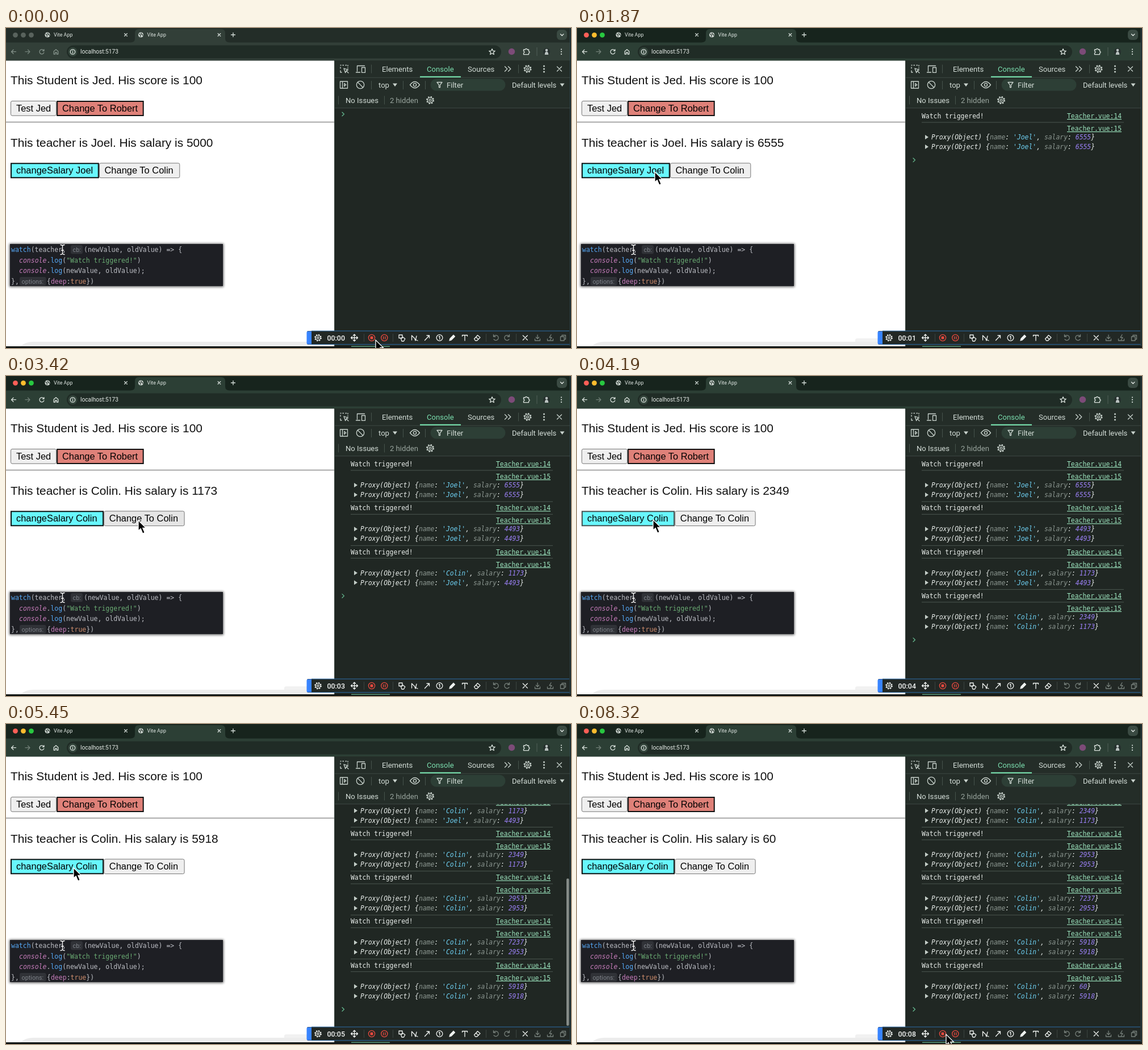
These frames come from a looping animation (995x563 px, 8.39 s). An HTML page:

```html
<!DOCTYPE html>
<html lang="en">
<head>
<meta charset="utf-8">
<title>Watch demo</title>
<style>
html, body { margin: 0; width: 100%; height: 100%; overflow: hidden; background: #fff; }
svg { display: block; width: 995px; height: 563px; }
text { white-space: pre; }
.tab { font: 8.9px Roboto, sans-serif; fill: #dfe6e2; }
.url { font: 10.2px Roboto, sans-serif; fill: #e6ece8; }
.tool { font: 13.1px Roboto, sans-serif; fill: #d3ddd7; }
.head { font: 20.9px "Liberation Sans", Arial, sans-serif; fill: #111; }
.btn { font: 16.45px "Liberation Sans", Arial, sans-serif; fill: #000; }
.log { font: 11.4px "DejaVu Sans Mono", monospace; fill: #e9eeeb; }
.obj { font-style: italic; }
.code { font: 11.5px "DejaVu Sans Mono", monospace; fill: #bcbec4; }
.hint { font: 10.8px Roboto, sans-serif; fill: #7f838a; }
.link { fill: #9be3bd; text-decoration: underline; }
.key { fill: #8b9690; }
.str { fill: #6ed0f2; }
.num { fill: #9b80f7; }
.fn { fill: #56a8f5; }
.prop { fill: #c77dbb; }
.line { fill: none; stroke-width: 1.3; stroke-linecap: round; stroke-linejoin: round; }
.plain { fill: #efefef; stroke: #767676; }
</style>
</head>
<body>
<svg viewBox="0 0 995 563">
  <defs>
    <clipPath id="consoleClip"><rect x="578" y="141" width="417" height="392"/></clipPath>
    <filter id="blur" x="-10%" y="-30%" width="120%" height="160%"><feGaussianBlur stdDeviation="2"/></filter>
    <g id="globe">
      <circle r="4.6" fill="#cbd3ce"/>
      <path d="M-3.4-1.5q2 .2 2.6 2t-.6 3M.8-3.6q-.8 2 .6 2.6t2.4 2.4" stroke="#37443d" stroke-width="1.4" fill="none"/>
    </g>
    <g id="gear" class="line">
      <circle r="4.7"/><circle r="1.9"/>
      <circle r="6" stroke-width="2" stroke-linecap="butt" stroke-dasharray="2.4 2.31"/>
    </g>
    <path id="cross" class="line" d="M-1-1L1 1M1-1L-1 1" vector-effect="non-scaling-stroke"/>
  </defs>

  <!-- browser frame -->
  <rect id="strip" width="995" height="58"/>
  <g id="bar">
    <path d="M0 25.5H219q8 0 8-7V9q0-7 7-7H379q7 0 7 7v9.500q0 7 8 7H995V58H0z"/>
  </g>
  <g id="lights"><circle cx="16.500" cy="12.300" r="4.400"/><circle cx="30.500" cy="12.300" r="4.400"/><circle cx="44.500" cy="12.300" r="4.400"/></g>
  <use href="#globe" x="73" y="12"/><use href="#globe" x="237.500" y="12"/>
  <text class="tab" x="84" y="15">Vite App</text>
  <text class="tab" x="248.500" y="15">Vite App</text>
  <g stroke="#d5ddd9">
    <use href="#cross" transform="translate(211 12) scale(2.3)"/>
    <use href="#cross" transform="translate(375.500 12) scale(2.3)"/>
    <path class="line" d="M396.500 12h7M400 8.500v7"/>
  </g>
  <rect x="970" y="3" width="18" height="18" rx="6" fill="#3a4a42"/>
  <path class="line" stroke="#e2e8e4" d="M976.500 10.800l2.700 2.700 2.700-2.700"/>
  <rect x="107" y="30.500" width="765" height="23" rx="11.500" fill="#202c26"/>
  <circle cx="117.500" cy="42" r="8" fill="#34453c"/>
  <g class="line" stroke="#d9e1dc"><circle cx="117.500" cy="42" r="4.200"/><path d="M117.500 41.700v2.200M117.500 39.900v.1"/></g>
  <text class="url" x="131" y="45.300">localhost:5173</text>
  <g id="nav" class="line">
    <path d="M17.500 41.700H9.500m3.500-3.500l-3.500 3.500 3.500 3.500"/>
    <path d="M66.600 40a4 4 0 1 0 .2 3.200M67 37.700V40.300H64.400"/>
    <path d="M84.200 41l3.800-3.200 3.800 3.200v5h-2.500v-3h-2.600v3h-2.500z"/>
  </g>
  <path class="line" stroke="#718078" d="M34 41.700h8m-3.500-3.500l3.500 3.500-3.500 3.500"/>
  <path class="line" stroke="#d9e1dc" stroke-width="1" d="M856 36.700l1.500 3.400 3.700.3-2.800 2.400.9 3.700-3.300-2-3.300 2 .9-3.700-2.800-2.400 3.700-.3z"/>
  <circle cx="890.500" cy="41.500" r="5.700" fill="#7c4b78"/>
  <path class="line" stroke="#d9e1dc" d="M911.500 38h3a1.600 1.600 0 0 1 3.200 0h2.800v3a1.600 1.600 0 0 1 0 3.200v2.500h-9v-2.800a1.500 1.500 0 0 0 0-3z"/>
  <path d="M935 34v15" stroke="#506158"/>
  <circle cx="952" cy="41.500" r="6" fill="#26302e"/>
  <g fill="#b9c2c0"><circle cx="952" cy="39" r="2.300"/><path d="M948.800 47q0-5.500 3.200-5.500t3.200 5.500z"/></g>
  <g fill="#d9e1dc"><circle cx="978" cy="37.500" r="1.100"/><circle cx="978" cy="41.700" r="1.100"/><circle cx="978" cy="45.900" r="1.100"/></g>

  <!-- page -->
  <rect y="57.500" width="578" height="503" fill="#fff"/>
  <path d="M26 560q8-8 22-8H530v8z" fill="#ececec"/>
  <path id="patch" d="M490 552v-3q0-3 4-3h36v6z" fill="#f1f1f1"/>
  <text class="head" x="8" y="99">This Student is Jed. His score is 100</text>
  <rect class="plain" x="8.500" y="128.500" width="80" height="25.700" rx="2.500"/>
  <text class="btn" x="18" y="147">Test Jed</text>
  <rect x="90.200" y="129" width="151.500" height="25" fill="#df8179" stroke="#111" stroke-width="2"/>
  <text class="btn" x="99" y="147">Change To Robert</text>
  <rect y="164.700" width="578" height="1.700" fill="#9b9b9b"/>
  <text class="head" id="teacher" x="8" y="208.500"></text>
  <rect id="salaryBox" x="9" y="238.300" height="25" fill="#68f7fd" stroke-width="2"/>
  <text class="btn" id="salaryText" x="18" y="256.300"></text>
  <g id="change">
    <rect id="changeBox" class="plain" x=".5" y="237.800" width="141.300" height="25.800" rx="2.500"/>
    <text class="btn" x="9.500" y="256.300">Change To Colin</text>
  </g>

  <!-- code card -->
  <rect x="6" y="379.500" width="377" height="76" fill="#000" opacity=".65" filter="url(#blur)"/>
  <rect x="7" y="380" width="375" height="74" fill="#1e1f24"/>
  <rect x="114" y="382" width="21" height="15.500" rx="3" fill="#303237"/>
  <rect x="24" y="438" width="46.500" height="15" rx="3" fill="#303237"/>
  <text class="hint" x="117.500" y="393.500">cb:</text>
  <text class="hint" x="27.500" y="449.500">options:</text>
  <g class="code">
    <text x="9" y="394"><tspan class="fn">watch</tspan>(teacher,</text>
    <text x="137" y="394">(newValue, oldValue) =&gt; {</text>
    <text x="23" y="412.500"><tspan class="prop obj">console</tspan>.<tspan class="fn">log</tspan>(<tspan fill="#6aab73">"Watch triggered!"</tspan>)</text>
    <text x="23" y="431"><tspan class="prop obj">console</tspan>.<tspan class="fn">log</tspan>(newValue, oldValue);</text>
    <text x="9" y="450">},</text>
    <text x="72" y="450">{<tspan class="prop">deep</tspan>:<tspan fill="#cf8e6d">true</tspan>})</text>
  </g>
  <path class="line" stroke="#fff" d="M96 381.500q3.500 0 3.500 2.500v12q0 2.500-3.500 2.500M103 381.500q-3.500 0-3.500 2.500v12q0 2.500 3.500 2.500M97.500 391h4"/>

  <!-- developer tools -->
  <rect x="578" y="57.500" width="417" height="503" fill="#202723"/>
  <rect x="578" y="57.500" width="417" height="83.500" fill="#242d28"/>
  <path d="M578 87.200H993M578 140.800H993" stroke="#3d4943"/>
  <path d="M578.500 58V560" stroke="#39443e"/>
  <rect x="729" y="84.800" width="72" height="2.200" fill="#74d9a8"/>
  <rect x="747.500" y="89.500" width="132" height="21" rx="10.500" fill="#2d3f36"/>
  <g class="tool">
    <text x="662" y="76.500">Elements</text><text x="741" y="76.500" fill="#7ce0b0" style="fill:#7ce0b0">Console</text>
    <text x="813" y="76.500">Sources</text><text x="656" y="104.500">top</text>
    <text x="776" y="104.500">Filter</text><text x="891" y="104.500">Default levels</text>
    <text x="598" y="131.700">No Issues</text><text x="676" y="131.700" style="fill:#9aa69f">2 hidden</text>
  </g>
  <path d="M681 97.500h8l-4 5.500zM975.500 97.500h8l-4 5.500z" fill="#c9d3cd"/>
  <path d="M643.500 64.500v15M643.500 93v15M699.500 93v15M738.500 93v15M585.500 119.500v15M666.500 119.500v15M902.500 64.500v15" stroke="#46534c"/>
  <g class="line" stroke="#c9d3cd">
    <path d="M589 65.500h1M593 65.500h1.500M598 65.500h1.500M602 65.500v1.500M589 69v2M589 75v3h2M602 70v1M595 71l7.500 2.700-3.300 1.500-1.500 3.500zM599.500 75.500l3.500 3.500"/>
    <path d="M618.500 76v-9.500h13M616.500 78h7M626.500 69.500h6v8.800h-6z"/>
    <path d="M878.500 67.700l4.300 4.300-4.300 4.300M884.500 67.700l4.300 4.300-4.300 4.300"/>
    <path d="M588.500 94h13v12h-13zM592.500 94v12M595.800 97.500l3 2.500-3 2.500z"/>
    <circle cx="624" cy="100" r="6.700"/><path d="M619.500 95.500l9 9"/>
    <path d="M711.500 100q8.500-11 17 0q-8.500 11-17 0z"/><circle cx="720" cy="100" r="2.600"/>
    <path d="M759 95.500h9l-3.500 4.700v4.300h-2v-4.300z"/>
    <use href="#gear" x="918.500" y="72"/><use href="#gear" x="747" y="127"/>
    <use href="#cross" transform="translate(974.500 72) scale(4)"/>
  </g>
  <g fill="#c9d3cd"><circle cx="947.500" cy="67" r="1.500"/><circle cx="947.500" cy="72" r="1.500"/><circle cx="947.500" cy="77" r="1.500"/></g>
  <g clip-path="url(#consoleClip)">
    <g id="logs"></g>
    <path id="prompt" class="line" stroke="#65b98f" d="M592-3.300l3.400 3.300-3.400 3.300"/>
    <rect id="thumb" x="987" width="4.600" rx="2.300" fill="#858c88"/>
  </g>
  <path d="M993.500 0V560" stroke="#2b4650"/>
  <rect x="994" width="1" height="563" fill="#101613"/>
  <rect y="560" width="995" height="3" fill="#111513"/>
  <rect x="608" y="559.500" width="68" height="1.500" fill="#5b9b7c"/>

  <!-- recorder bar -->
  <rect x="530" y="533" width="463" height="24" rx="2" fill="#222825"/>
  <path d="M538 533H992M538 556.700H992.500" stroke="#2d6ca8"/>
  <path d="M532 533.500h6v23h-6q-2.500 0-2.500-2.500v-18q0-2.500 2.500-2.500z" fill="#3884ff"/>
  <text id="clock" x="565.500" y="549.700" style="font:500 12.400px Roboto,sans-serif;fill:#f4f6f5"></text>
  <g class="line" stroke="#f0f3f1">
    <use href="#gear" transform="translate(549.500 545) scale(.9)"/>
    <path d="M607.500 545h12M613.500 539v12M609.500 543l-2 2 2 2M617.500 543l2 2-2 2M611.500 541l2-2 2 2M611.500 549l2 2 2-2"/>
    <path d="M692 540h6v5.500h-6zM695.500 546.500l3-3 4.300 3.200-2.300 4.300h-3.500z"/>
    <path d="M714.500 541v8M714.500 541l5 5 1.500 4 2-8M721.500 548.500l3.500 1.500"/>
    <path d="M737.500 549.500l8-8.500M741 541h4.500v4.500"/>
    <circle cx="763.500" cy="545" r="5.400"/><path d="M762.300 543.300l1.500-1v5.400"/>
    <path d="M781 550l1-3.500 6-6.200 2.400 2.400-6 6.200z" fill="#f0f3f1"/>
    <path d="M803.500 542.300v-1.800h9v1.800M808 540.500v9.500"/>
    <path d="M824.500 547l6-6.500 4.500 4-5.500 5.500h-3zM827.500 543.800l4.500 4"/>
    <use href="#cross" transform="translate(914.300 545) scale(4)"/>
  </g>
  <g class="line" stroke="#77807b">
    <path d="M858.500 539.500v3.500h3.500M858.800 542.700a4.500 4.500 0 1 1 .2 5"/>
    <path d="M886.500 539.500v3.500h-3.500M886.200 542.700a4.500 4.500 0 1 0-.2 5"/>
    <path d="M936 540v6.500m-2.700-2.500l2.700 2.700 2.700-2.700M931.500 547v3h9v-3"/>
    <path d="M960 539.500l-3 5h4l-2.500 4M953.500 547v3h10v-3"/>
    <path d="M976.500 543h6.500v7h-6.500zM979 543v-2.500h6.500v7H983"/>
  </g>
  <path d="M630.500 538v14M681.500 538v14M845.500 538v14M898.500 538v14" stroke="#3b4440"/>
  <g class="line" stroke="#ea4a3f">
    <circle cx="644" cy="545" r="5.600"/><rect x="642.200" y="543.200" width="3.600" height="3.600" fill="#ea4a3f"/>
    <circle cx="666.300" cy="545" r="5.600"/><path d="M664.700 542.800v4.400M667.900 542.800v4.400"/>
  </g>
  <path id="cursor" d="M0 0V18.300L4.200 14.500 7.700 23 11.300 21.500 7.800 13.300H13.300z" fill="#000" stroke="#fff" stroke-width="1.300"/>
</svg>
<script>
const LOOP = 8390, PITCH = 77.3, VIEW = 392, FOCUS = 1020;
const $ = id => document.getElementById(id);

// time, new name, new salary, old name, old salary, which button was pressed
const logs = [
  [1440, 'Joel', 6555, 'Joel', 6555, 'salary'],
  [2130, 'Joel', 4493, 'Joel', 4493, 'salary'],
  [2990, 'Colin', 1173, 'Joel', 4493, 'change'],
  [3680, 'Colin', 2349, 'Colin', 1173, 'change'],
  [4270, 'Colin', 2953, 'Colin', 2953, 'salary'],
  [4620, 'Colin', 7237, 'Colin', 2953, 'change'],
  [5300, 'Colin', 5918, 'Colin', 5918, 'salary'],
  [5900, 'Colin', 60, 'Colin', 5918, 'change']
];

// time, x, y of the pointer tip
const path = [
  [0, 651, 549], [160, 651, 549], [930, 124, 257], [1110, 137, 253],
  [2300, 137, 253], [2720, 233, 254], [3680, 233, 254], [4080, 134, 253],
  [4270, 134, 253], [4500, 228, 253], [4790, 228, 253], [5130, 119, 253],
  [5530, 119, 253], [5740, 226, 253], [5960, 226, 253], [6580, 750, 437],
  [6780, 750, 437], [7050, 765, 505], [7450, 650, 546], [LOOP, 650, 546]
];

const proxy = (name, salary, y) =>
  `<path d="M613 ${y - 8}v8l6-4z" fill="#c3cdc7"/>
   <text class="log obj" x="624" y="${y}">Proxy(Object) {<tspan class="key">name</tspan>: <tspan class="str">'${name}'</tspan>, <tspan class="key">salary</tspan>: <tspan class="num">${salary}</tspan>}</text>`;

$('logs').innerHTML = logs.map(([, name, salary, oldName, oldSalary], i) =>
  `<g transform="translate(0 ${i * PITCH})">
    ${i ? '<path d="M607 143.700H963" stroke="#4b5750"/>' : ''}
    <text class="log" x="607" y="159">Watch triggered!</text>
    <text class="log link" x="863" y="159">Teacher.vue:14</text>
    <path d="M607 166H963" stroke="#4b5750"/>
    <text class="log link" x="863" y="181">Teacher.vue:15</text>
    ${proxy(name, salary, 196)}${proxy(oldName, oldSalary, 213)}
  </g>`).join('');
const groups = [...$('logs').children];
const lights = [...$('lights').children];

function pointer(t) {
  const i = Math.max(1, path.findIndex(p => p[0] > t));
  const [t0, x0, y0] = path[i - 1], [t1, x1, y1] = path[i];
  const u = (t - t0) / (t1 - t0), k = u * u * (3 - 2 * u);
  return [x0 + (x1 - x0) * k, y0 + (y1 - y0) * k];
}

function draw(t) {
  const focused = t >= FOCUS;
  const count = logs.filter(l => l[0] <= t).length;
  const [, name, salary] = count ? logs[count - 1] : [0, 'Joel', 5000];
  const next = logs[count];
  const pressed = next && next[0] - t <= 180 ? next[5] : '';
  const [x, y] = pointer(t);

  $('strip').setAttribute('fill', focused ? '#17241d' : '#232d28');
  $('bar').setAttribute('fill', focused ? '#2c3f35' : '#323f38');
  $('nav').setAttribute('stroke', focused ? '#d9e1dc' : '#839189');
  lights.forEach((c, i) => c.setAttribute('fill', focused ? ['#ff5f57', '#febc2e', '#28c840'][i] : '#59635d'));
  $('patch').style.opacity = focused ? 1 : 0;

  const left = name === 'Joel' ? 164 : 172.3;
  $('teacher').textContent = `This teacher is ${name}. His salary is ${salary}`;
  $('salaryText').textContent = `changeSalary ${name}`;
  $('salaryBox').setAttribute('width', left - 10.2);
  $('salaryBox').setAttribute('stroke', pressed === 'salary' ? '#465353' : '#0a1111');
  $('change').setAttribute('transform', `translate(${left} 0)`);
  const hover = x > left && x < left + 142 && y > 237 && y < 264;
  $('changeBox').style.fill = pressed === 'change' ? '#f6f6f6' : hover ? '#e5e5e5' : '#efefef';

  const scroll = Math.max(0, 155 + (count - 1) * PITCH - 424.7);
  groups.forEach((g, i) => g.style.display = i < count ? '' : 'none');
  $('logs').setAttribute('transform', `translate(0 ${-scroll})`);
  $('prompt').setAttribute('transform', `translate(0 ${count ? 155 + count * PITCH - scroll : 151.5})`);
  const size = VIEW * VIEW / (VIEW + scroll) - 3;
  $('thumb').setAttribute('y', 531 - size);
  $('thumb').setAttribute('height', size);
  $('thumb').style.opacity = scroll ? Math.min(1, Math.max(0, (7350 - t) / 200)) : 0;

  $('clock').textContent = '00:0' + Math.floor((t + 20) / 1000);
  $('cursor').setAttribute('transform', `translate(${x} ${y})`);
}

function frame() {
  draw(performance.now() % LOOP);
  requestAnimationFrame(frame);
}
frame();
</script>
</body>
</html>
```
